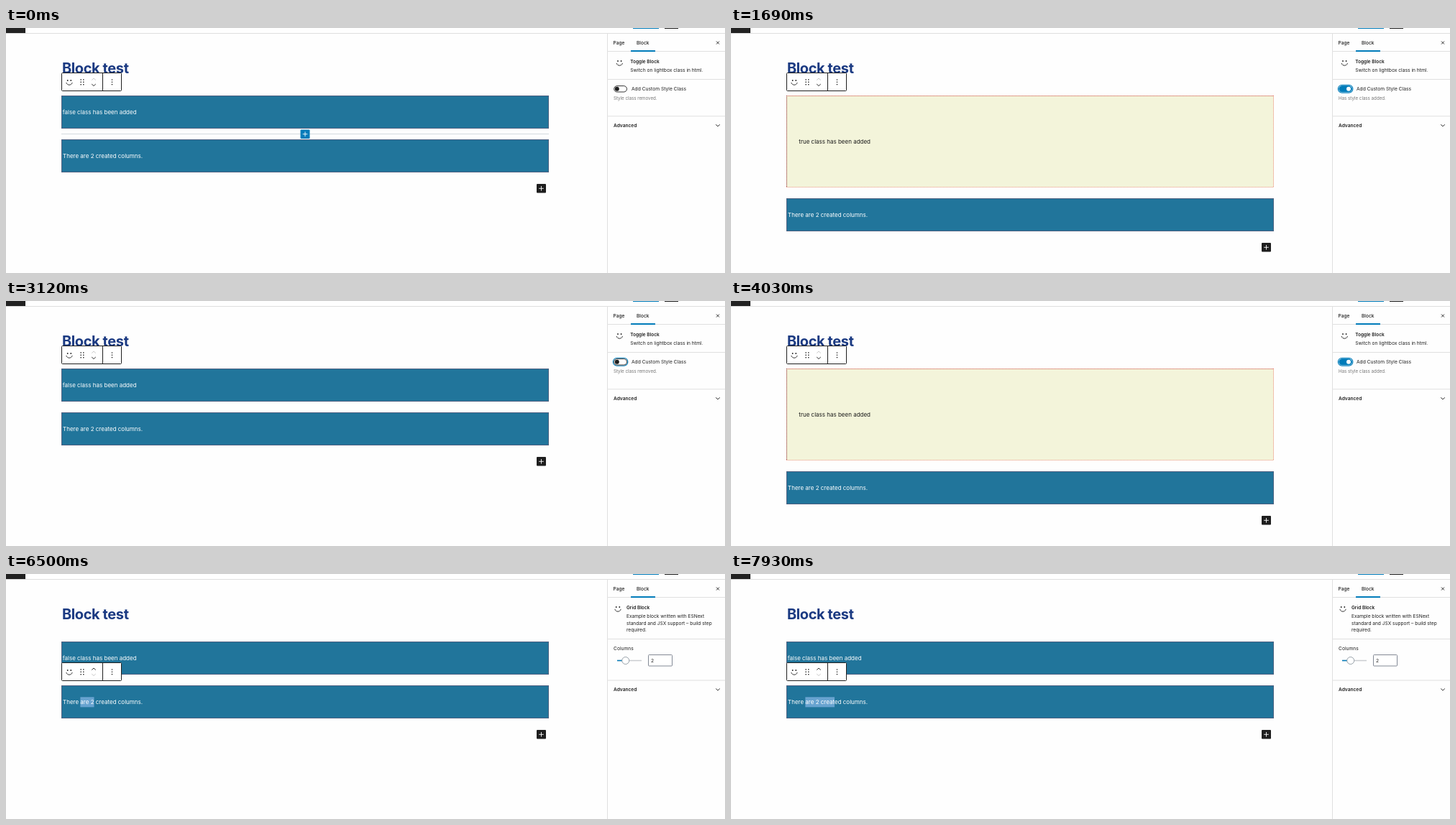
Write an HTML page with a canvas that moves like this. It is 1000 px wide and 341 px high and loops after 8000 ms.

```html
<!DOCTYPE html>
<html lang="en">
<head>
<meta charset="utf-8">
<title>Block editor</title>
<style>
  html, body { margin: 0; width: 100%; height: 100%; overflow: hidden; background: #fefefe; }
  canvas { display: block; width: 1000px; height: 341px; }
</style>
</head>
<body>
<canvas id="stage"></canvas>
<script>
const W = 1000, H = 341, LOOP = 8000;
const INK = '#1e1e1e', BLUE = '#007cba', PANEL = '#21759b', PAPER = '#fefefe', RULE = '#e0e0e0';
const COLUMNS = 'There are 2 created columns.';

const canvas = document.getElementById('stage');
const ctx = canvas.getContext('2d');
const dpr = window.devicePixelRatio || 1;
canvas.width = W * dpr;
canvas.height = H * dpr;

// Toggle states: start time, checked, knob position, track fill, focus ring
const TOGGLE = [
  [0, 0, 0, 0, 0],
  [1300, 0, 0, 0, 1],
  [1430, 1, 0, 0.1, 1],
  [1560, 1, 0.6, 0.6, 1],
  [1690, 1, 1, 1, 1],
  [2860, 0, 1, 1, 1],
  [2990, 0, 0.3, 0.5, 1],
  [3120, 0, 0, 0, 1],
  [3900, 1, 0.5, 0.5, 1],
  [4030, 1, 1, 1, 1],
  [4810, 0, 0.4, 0.7, 1],
  [4940, 0, 0, 0.15, 1],
  [5070, 0, 0, 0, 1]
];

// Selected characters: start time, count
const SELECTION = [[6500, 5], [6630, 7], [6760, 8], [6890, 9], [7800, 10], [7930, 11]];

const at = (steps, t) => steps.filter(s => s[0] <= t).pop();

function font(size, weight = 400) {
  ctx.font = `${weight} ${size}px Inter, "Open Sans", sans-serif`;
}

function text(str, x, y, size, color = INK, weight = 400, spacing = 0) {
  font(size, weight);
  ctx.letterSpacing = spacing + 'px';
  ctx.fillStyle = color;
  ctx.fillText(str, x, y);
  ctx.letterSpacing = '0px';
}

function rect(x, y, w, h, color) {
  ctx.fillStyle = color;
  ctx.fillRect(x, y, w, h);
}

function line(points, color = INK, width = 1) {
  ctx.strokeStyle = color;
  ctx.lineWidth = width;
  ctx.beginPath();
  points.forEach(([x, y], i) => i ? ctx.lineTo(x, y) : ctx.moveTo(x, y));
  ctx.stroke();
}

function box(x, y, w, h, r, fill, stroke, width = 1) {
  ctx.beginPath();
  ctx.roundRect(x, y, w, h, r);
  if (fill) { ctx.fillStyle = fill; ctx.fill(); }
  if (stroke) { ctx.strokeStyle = stroke; ctx.lineWidth = width; ctx.stroke(); }
}

function dot(x, y, r, fill, stroke) {
  box(x - r, y - r, 2 * r, 2 * r, r, fill, stroke, 0.8);
}

function chevron(x, y, dir, color = INK, w = 2.8) {
  line([[x - w, y - dir * 1.3], [x, y + dir * 1.3], [x + w, y - dir * 1.3]], color, 0.9);
}

function plus(x, y, color) {
  box(x - 6.5, y - 6.3, 13, 12.6, 1, color);
  line([[x - 3.3, y], [x + 3.3, y]], '#fff', 0.9);
  line([[x, y - 3.3], [x, y + 3.3]], '#fff', 0.9);
}

function smiley(x, y) {
  dot(x - 2.3, y - 2.3, 0.9, INK);
  dot(x + 2.3, y - 2.3, 0.9, INK);
  ctx.strokeStyle = INK;
  ctx.lineWidth = 0.9;
  ctx.beginPath();
  ctx.moveTo(x - 4.2, y + 0.6);
  ctx.bezierCurveTo(x - 3, y + 5, x + 3, y + 5, x + 4.2, y + 0.6);
  ctx.stroke();
}

function dotted(points, color) {
  ctx.setLineDash([1, 1]);
  line(points, color, 1);
  ctx.setLineDash([]);
}

function bluePanel(y) {
  rect(77, y, 678, 46, PANEL);
  ctx.setLineDash([1, 1]);
  box(77.5, y + 0.5, 677, 45, 0, null, 'rgba(190,40,60,0.55)');
  ctx.setLineDash([]);
}

function yellowPanel() {
  rect(77, 94, 678, 128, '#f3f4da');
  dotted([[77, 94.5], [755, 94.5]], '#d04a42');
  dotted([[77.5, 94], [77.5, 222]], '#8a1f22');
  dotted([[754.5, 94], [754.5, 222]], '#ee8a80');
  dotted([[77, 221.5], [755, 221.5]], '#f09a90');
}

function toolbar(y, first) {
  box(77.5, y + 0.5, 83, 25, 1, '#fff', INK);
  line([[134.5, y], [134.5, y + 26]]);
  const mid = y + 13.3;
  smiley(88, mid);
  for (let i = -1; i <= 1; i++) {
    for (const x of [104.2, 107.8]) rect(x - 0.7, mid + i * 3.4 - 0.7, 1.4, 1.4, INK);
    dot(147.5, mid + i * 3.3, 0.8, INK);
  }
  chevron(122, mid - 4, -1, first ? '#c4c4c4' : INK);
  chevron(122, mid + 4, 1, first ? INK : '#c4c4c4');
}

function mix(a, b, k) {
  return `rgb(${a.map((v, i) => Math.round(v + (b[i] - v) * k)).join()})`;
}

function toggle([, on, knob, fill, ring]) {
  const track = mix([255, 255, 255], [0, 124, 186], fill);
  const edge = mix([30, 30, 30], [0, 124, 186], fill);
  if (ring) box(844.3, 79.3, 20.6, 11, 5.5, '#fff', BLUE, 1.1);
  box(845.7, 80.6, 17.8, 8.4, 4.2, track, edge, 0.9);
  dot(849.8 + 9.2 * knob, 84.8, 3, on ? '#fff' : INK);
}

function frameChrome() {
  rect(0, 0, W, H, PAPER);
  rect(0, 7, W, 1, '#dfdfdf');
  rect(0, 0, 27, 7, '#222');
  rect(872, 0, 36, 1, BLUE);
  rect(916, 0, 19, 1, INK);
  rect(836, 8, 1, H - 8, RULE);
  rect(837, 32, W - 837, 1, RULE);
  rect(869, 31, 34, 2, BLUE);
  text('Page', 844.5, 23, 6.6, INK, 500);
  text('Block', 877, 23, 6.6, INK, 500);
  line([[988, 18.5], [992, 22.5]], INK, 0.9);
  line([[992, 18.5], [988, 22.5]], INK, 0.9);
}

function advanced(y) {
  rect(837, y - 13, W - 837, 1, RULE);
  text('Advanced', 845, y + 2.4, 6.6, INK, 600);
  chevron(990, y + 0.3, 1);
}

function toggleSidebar(state) {
  smiley(853.3, 48.3);
  text('Toggle Block', 868.3, 49, 6.5, INK, 600);
  text('Switch on lightbox class in html.', 868.3, 61, 6.7);
  rect(837, 71, W - 837, 1, RULE);
  toggle(state);
  text('Add Custom Style Class', 870, 87.3, 6.7);
  text(state[1] ? 'Has style class added.' : 'Style class removed.', 845, 100.4, 6.2, '#757575');
  advanced(135.3);
}

function gridSidebar() {
  smiley(851, 48.3);
  text('Grid Block', 863, 49, 6.5, INK, 600);
  ['Example block written with ESNext', 'standard and JSX support – build step', 'required.']
    .forEach((s, i) => text(s, 863, 61 + i * 9.6, 6.6));
  rect(837, 90, W - 837, 1, RULE);
  text('Columns', 845, 106.3, 6.7);
  line([[850, 120.5], [884, 120.5]], '#c9ccd0', 1.5);
  line([[850, 120.5], [861, 120.5]], BLUE, 1.5);
  dot(861.7, 120.5, 5, '#fff', '#7e8993');
  box(893.5, 112.5, 33, 15.5, 1, '#fff', '#757c8a', 0.9);
  text('2', 897, 123, 6.7);
  advanced(160.5);
}

function selection(count, y) {
  font(8);
  const width = n => ctx.measureText(COLUMNS.slice(0, n)).width;
  const start = 6;
  rect(79 + width(start), y - 10, width(start + count) - width(start), 14, '#68a3d0');
}

function draw(t) {
  ctx.setTransform(dpr, 0, 0, dpr, 0, 0);
  const state = at(TOGGLE, t);
  const selected = at(SELECTION, t);
  const on = state[1];
  const top = on ? 237 : 155;

  frameChrome();
  text('Block test', 78, 62.8, 20, '#1b3a82', 700, -0.4);
  if (on) yellowPanel(); else bluePanel(94);
  bluePanel(top);
  if (selected) selection(selected[1], top + 26.3);

  if (on) text('true class has been added', 94.3, 161.3, 8, '#1a1a1a');
  else text('false class has been added', 78.7, 120.4, 8, '#fff');
  text(COLUMNS, 79, top + 26.2, 8, '#fff');
  plus(744.5, top + 68.3, INK);

  if (t < 390) {
    rect(77, 147, 678, 1, '#d3dade');
    plus(416, 147.7, BLUE);
  }
  toolbar(selected ? 123 : 62, !selected);
  if (selected) gridSidebar(); else toggleSidebar(state);
}

function tick() {
  draw(performance.now() % LOOP);
  requestAnimationFrame(tick);
}
tick();
</script>
</body>
</html>
```
